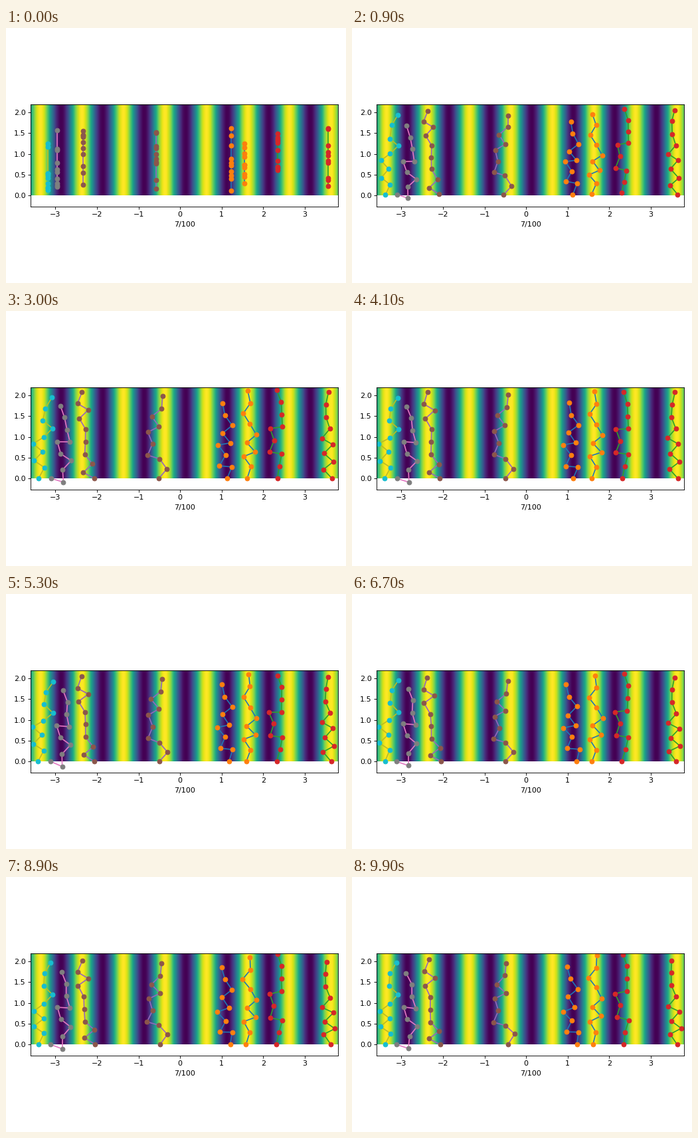
Recreate the animation shown at these times as a matplotlib script. Size 512 px wide and 384 px high, loop 10 s.

```python
import numpy as np
import matplotlib.pyplot as plt
from matplotlib.animation import FuncAnimation

W, H, DPI = 512, 384, 80
FRAMES, INTERVAL = 100, 100
BOND = 0.3
SETTLE = 4.0    # decay, in steps, of the unfolding from a column
UNIT = 62.62    # pixels per data unit on both axes
ORIGIN = 262.2, 252.19

rng = np.random.default_rng(7)
steps = np.arange(FRAMES)


def wander(n, sigma):
    """Random walks centred on zero."""
    walk = np.cumsum(rng.normal(0, sigma, (FRAMES, n)), axis=0)
    return walk - walk.mean(axis=0)


def chain(start, centre, *pose):
    """Positions (FRAMES, beads, 2) of a chain of rigid, trembling bonds.

    It begins as a column of random heights at x = start, then unfolds around
    x = centre; pose gives the bond angles from the vertical, bottom to top.
    """
    n = len(pose)
    angles = np.radians(pose + wander(n, 0.8))
    beads = np.zeros((FRAMES, n + 1, 2))
    beads[:, 1:, 0] = np.cumsum(BOND * np.sin(angles), axis=1)
    beads[:, 1:, 1] = np.cumsum(BOND * np.cos(angles), axis=1)
    beads[:, :, 0] += centre - beads[:, :, 0].mean(axis=1, keepdims=True)

    heights = np.sort(rng.uniform(0.1, 1.65, n + 1))
    column = np.column_stack([np.full(n + 1, start), heights])
    ease = (1 - np.exp(-steps / SETTLE))[:, None, None]
    return column + ease * (beads - column)


chains = [
    chain(1.23, 1.09, 17, -85, 27, -40, 78, -36, 52, -35, -12),
    chain(2.35, 2.34, 13, 13, -80, 20, -20, 82, 0, 0, -19),
    chain(-2.33, -2.28, -60, 50, -40, 0, 0, -30, 50, -60, 20),
    chain(-2.95, -2.82, 110, 0, 44, -53, -17, 93, -14, -4, -22),
    chain(-3.18, -3.30, 26, -56, 45, -50, 57, 47, -48, 8, 32),
    chain(1.54, 1.66, 20, -33, 69, -42, 53, -30, -35, 35, -9),
    chain(3.56, 3.55, -39, 57, -50, 43, -62, 42, -21, 0, 10),
    chain(-0.58, -0.56, 41, -39, -72, 23, -20, 63, -39, 50, 5),
]

fig = plt.figure(figsize=(W / DPI, H / DPI), dpi=DPI)
left, right, top, bottom = 37.4, 500.2, 115.2, 268.7
ax = fig.add_axes([left / W, 1 - bottom / H, (right - left) / W, (bottom - top) / H])

x_min, x_max = (left - ORIGIN[0]) / UNIT, (right - ORIGIN[0]) / UNIT
y_min, y_max = (ORIGIN[1] - bottom) / UNIT, (ORIGIN[1] - top) / UNIT
xs = np.linspace(x_min, x_max, 400)
field = np.tile(np.cos(2 * np.pi * (xs - 0.64)), (2, 1))
ax.imshow(field, extent=(x_min, x_max, 0, y_max), cmap="viridis",
          aspect="auto", vmin=-1, vmax=1)
ax.set(xlim=(x_min, x_max), ylim=(y_min, y_max), xlabel="7/100",
       xticks=range(-3, 4), yticks=np.arange(0, 2.1, 0.5))

artists = []
for i in range(len(chains)):
    c = 2 * i % 10
    artists += [ax.plot([], [], color=f"C{c}")[0],
                ax.plot([], [], "o", color=f"C{c + 1}")[0]]


def update(k):
    for i, artist in enumerate(artists):
        artist.set_data(*chains[i // 2][k].T)
    return artists


anim = FuncAnimation(fig, update, frames=FRAMES, interval=INTERVAL,
                     repeat=True, repeat_delay=0)
plt.show()
```
